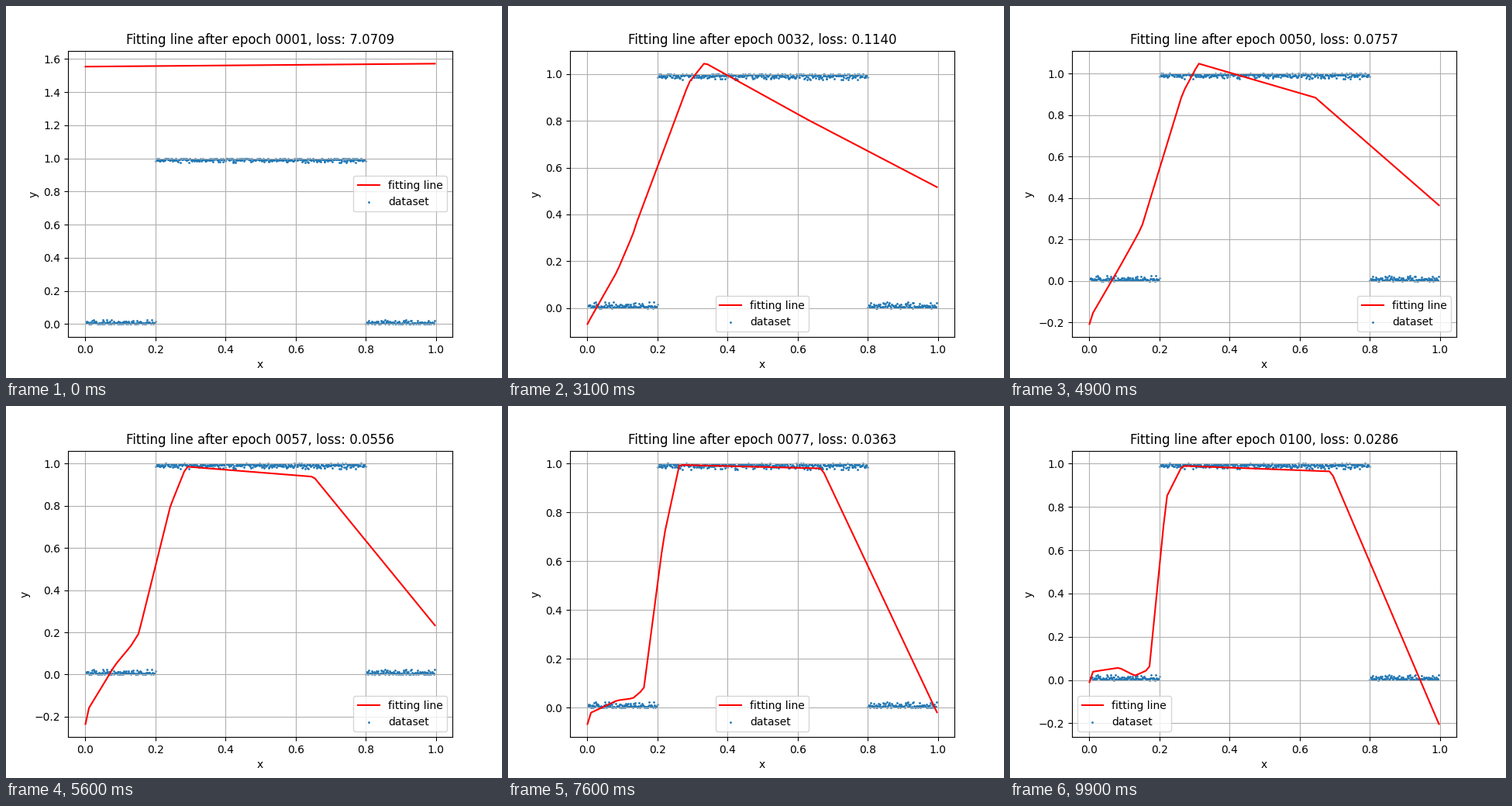
Recreate the animation shown at these times as a matplotlib script. Size 640 by 480 pixels, loop 10 s.

```python
import matplotlib.pyplot as plt
import numpy as np
from matplotlib.animation import FuncAnimation

EPOCHS = 100
X_MIN, X_MAX = 0.0006, 0.9975
xs = np.linspace(X_MIN, X_MAX, 100)

# Key poses, one per epoch in KEYS: heights of the bends from left to right,
# the x of the plateau's left corner, and the loss.
KEYS = (43, 57, 69, 86, 100)
POSES = dict(
    start=(-0.181, -0.235, -0.11, -0.018, -0.01),
    bump=(0.079, 0.045, 0.03, 0.03, 0.057),
    dip=(0.262, 0.135, 0.075, -0.002, 0.02),
    foot=(0.325, 0.195, 0.118, 0.03, 0.05),
    shoulder=(1.013, 0.8, 0.56, 0.85, 0.845),
    top=(1.111, 0.986, 0.978, 1.014, 0.99),
    corner=(0.83, 0.938, 0.978, 0.983, 0.964),
    end=(0.497, 0.233, 0.083, -0.133, -0.2035),
    top_x=(0.335, 0.288, 0.252, 0.275, 0.265),
    loss=(0.0958, 0.0556, 0.0409, 0.0312, 0.0286),
)


def smoothstep(a, b, v):
    t = np.clip((v - a) / (b - a), 0, 1)
    return t * t * (3 - 2 * t)


def bent_fit(epoch, pose):
    """Piecewise linear fit whose bends drift with the epoch."""
    hook = max(0.125, 0.0105 * (epoch - 31))
    knots = (
        (X_MIN, pose["start"]),
        (0.0106, pose["start"] + hook * (pose["bump"] - pose["start"])),
        (0.085, pose["bump"]),
        (0.13, pose["dip"]),
        (0.128 + 0.00043 * epoch, pose["foot"]),
        (pose["top_x"] - 0.045, pose["shoulder"]),
        (pose["top_x"], pose["top"]),
        (0.6 + 0.0009 * epoch, pose["corner"]),
        (X_MAX, pose["end"]),
    )
    return np.interp(xs, *zip(*knots))


def state(epoch):
    """Fit and loss: a flat line settles, then bends towards the data."""
    pose = {name: np.interp(epoch, KEYS, vals) for name, vals in POSES.items()}
    settle = np.exp(-(epoch - 1) / 2.5)
    flat = 0.651 - 0.0065 * xs + settle * (0.903 + 0.0245 * xs)
    flat_loss = 0.2308 + 6.8401 * np.exp(1 - epoch)
    bend = smoothstep(22, 35, epoch)
    y = flat + bend * (bent_fit(epoch, pose) - flat)
    return y, flat_loss + bend * (pose["loss"] - flat_loss)


# Box function with one-sided noise
rng = np.random.default_rng(4)
n = 600
data_x = X_MIN + (X_MAX - X_MIN) * (np.arange(n) + rng.random(n)) / n
inside = (data_x > 0.2) & (data_x < 0.8)
noise = np.minimum(np.abs(rng.normal(0, 0.01, n)), 0.025)
data_y = np.abs(inside - noise)

fig, ax = plt.subplots(figsize=(6.4, 4.8), dpi=100)
line, = ax.plot(xs, state(1)[0], color="red", label="fitting line")
ax.scatter(data_x, data_y, s=1, label="dataset")
pad_x = 0.05 * (X_MAX - X_MIN)
ax.set_xlim(X_MIN - pad_x, X_MAX + pad_x)
ax.set_xlabel("x")
ax.set_ylabel("y")
ax.grid(True)
ax.legend(loc="best")
title = ax.set_title("")


def update(i):
    epoch = i + 1
    y, loss = state(epoch)
    lo, hi = min(0, y.min()), max(1, y.max())
    pad = 0.05 * (hi - lo)
    ax.set_ylim(lo - pad, hi + pad)
    line.set_ydata(y)
    title.set_text(f"Fitting line after epoch {epoch:04d}, loss: {loss:.4f}")
    return line, title


anim = FuncAnimation(fig, update, frames=EPOCHS, interval=100,
                     repeat=True, repeat_delay=0, blit=False)
plt.show()
```
